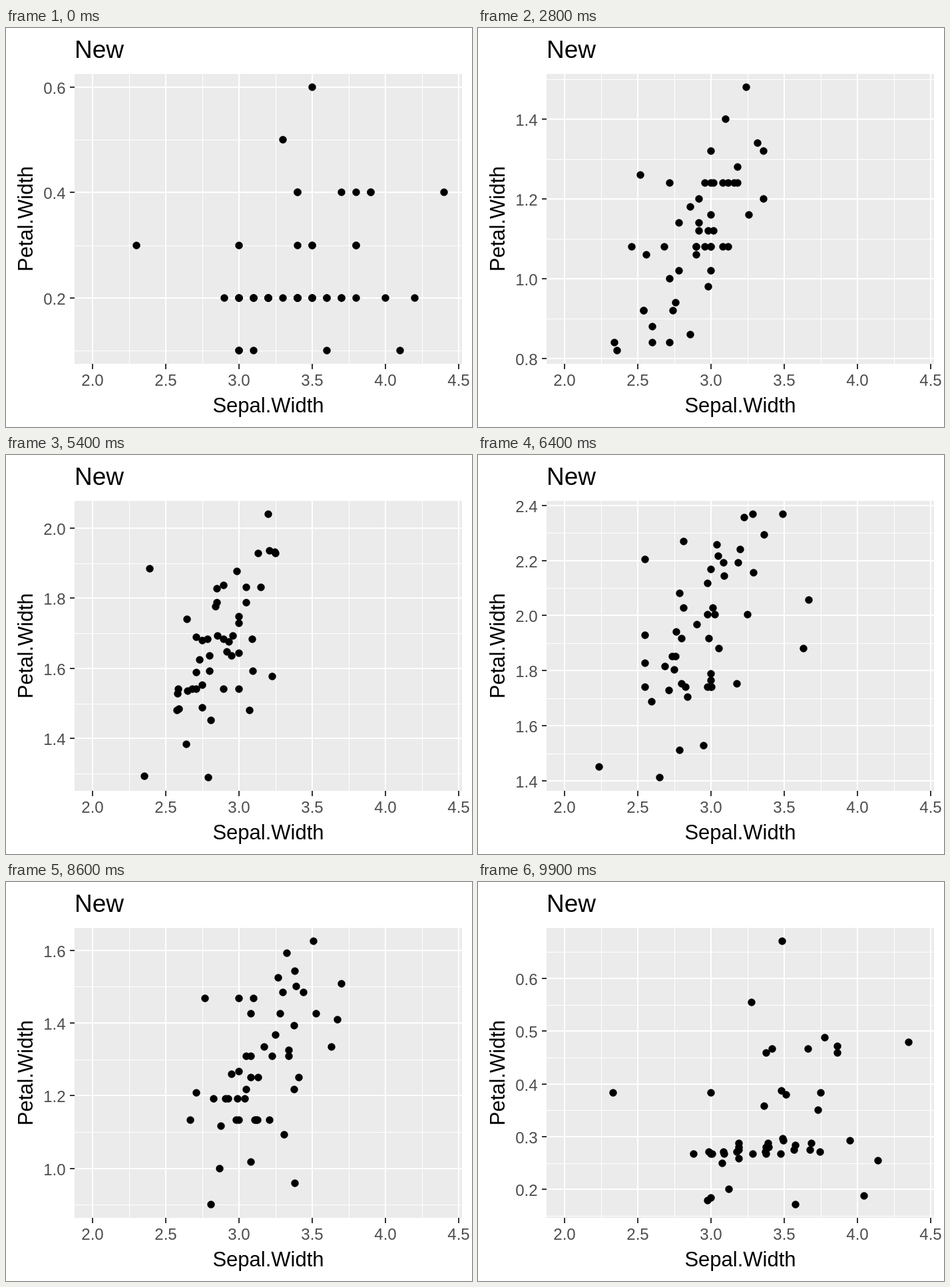
Animation, 700 px wide and 600 px high, one loop 10 s. Source, as an HTML page with a canvas:

```html
<!DOCTYPE html>
<html lang="en">
<head>
<meta charset="utf-8">
<title>Petal.Width by Sepal.Width</title>
<style>
  html, body { margin: 0; width: 100%; height: 100%; overflow: hidden; background: #fff; }
  canvas { display: block; }
</style>
</head>
<body>
<canvas id="plot" width="700" height="600"></canvas>
<script>
// Iris measurements in millimetres, in data set order.
const setosaSepal = [
  35, 30, 32, 31, 36, 39, 34, 34, 29, 31, 37, 34, 30, 30, 40, 44, 39, 35, 38, 38, 34, 37, 36, 33, 34,
  30, 34, 35, 34, 32, 31, 34, 41, 42, 31, 32, 35, 36, 30, 34, 35, 23, 32, 35, 38, 30, 38, 32, 37, 33];
const setosaPetal = [
  2, 2, 2, 2, 2, 4, 3, 2, 2, 1, 2, 2, 1, 1, 2, 4, 4, 3, 3, 3, 2, 4, 2, 5, 2,
  2, 4, 2, 2, 2, 2, 4, 1, 2, 2, 2, 2, 1, 2, 2, 3, 3, 2, 6, 4, 3, 2, 2, 2, 2];
const versicolorSepal = [
  32, 32, 31, 23, 28, 28, 33, 24, 29, 27, 20, 30, 22, 29, 29, 31, 30, 27, 22, 25, 32, 28, 25, 28, 29,
  30, 28, 30, 29, 26, 24, 24, 27, 27, 30, 34, 31, 23, 30, 25, 26, 30, 26, 23, 27, 30, 29, 29, 25, 28];
const versicolorPetal = [
  14, 15, 15, 13, 15, 13, 16, 10, 13, 14, 10, 15, 10, 14, 13, 14, 15, 10, 15, 11, 18, 13, 15, 12, 13,
  14, 14, 17, 15, 10, 11, 10, 12, 16, 15, 16, 15, 13, 13, 13, 12, 14, 12, 10, 13, 12, 13, 13, 11, 13];
const virginicaSepal = [
  33, 27, 30, 29, 30, 30, 25, 29, 25, 36, 32, 27, 30, 25, 28, 32, 30, 38, 26, 22, 32, 28, 28, 27, 33,
  32, 28, 30, 28, 30, 28, 38, 28, 28, 26, 30, 34, 31, 30, 31, 31, 31, 27, 32, 33, 30, 25, 30, 34, 30];
const virginicaPetal = [
  25, 19, 21, 18, 22, 21, 17, 18, 18, 25, 20, 19, 21, 20, 24, 23, 18, 22, 23, 15, 23, 20, 20, 18, 21,
  18, 18, 18, 21, 16, 19, 20, 22, 15, 14, 23, 24, 18, 18, 21, 24, 23, 19, 23, 25, 23, 19, 20, 23, 18];

const states = [
  { sepal: setosaSepal, petal: setosaPetal },
  { sepal: versicolorSepal, petal: versicolorPetal },
  { sepal: virginicaSepal, petal: virginicaPetal },
];
// Start and length of each transition, in steps of 100 ms.
const transitions = [
  { start: 8, length: 25 },
  { start: 42, length: 25 },
  { start: 76, length: 24 },
];
const STEP_MS = 100, STEPS = 100;
const panel = { left: 103, top: 69, right: 685, bottom: 505 };
const ctx = document.getElementById('plot').getContext('2d');

// Axis breaks by the extended Wilkinson algorithm (Talbot, Lin and Hanrahan).
function extendedBreaks(lo, hi, wanted = 5) {
  const nice = [1, 5, 2, 2.5, 4, 3];
  const range = hi - lo, unit = (0.1 * range) ** 2;
  const weigh = (simple, cover, dense) => 0.25 * simple + 0.2 * cover + 0.5 * dense + 0.05;
  let best = { score: -2 };
  for (let j = 1; ; j++) {
    for (let i = 0; i < nice.length; i++) {
      const q = nice[i], simple = 1 - i / (nice.length - 1) - j;
      if (weigh(simple + 1, 1, 1) < best.score) return best;
      for (let k = 2; ; k++) {
        const denseMax = k >= wanted ? 2 - (k - 1) / (wanted - 1) : 1;
        if (weigh(simple + 1, 1, denseMax) < best.score) break;
        for (let z = Math.ceil(Math.log10(range / (k + 1) / j / q)); ; z++) {
          const step = j * q * 10 ** z, span = step * (k - 1);
          const coverMax = span > range ? 1 - ((span - range) / 2) ** 2 / unit : 1;
          if (weigh(simple + 1, coverMax, denseMax) < best.score) break;
          const last = Math.ceil(lo / step) * j;
          for (let s = Math.floor(hi / step) * j - (k - 1) * j; s <= last; s++) {
            const min = s * step / j, max = min + span;
            const hasZero = s % j === 0 && min <= 0 && max >= 0 ? 1 : 0;
            const cover = 1 - 0.5 * ((hi - max) ** 2 + (lo - min) ** 2) / unit;
            const ratio = (Math.max(max, hi) - Math.min(min, lo)) / step / (wanted - 1);
            const score = weigh(simple + hasZero, cover, 2 - Math.max(ratio, 1 / ratio));
            if (score > best.score) best = { score, min, step, count: k };
          }
        }
      }
    }
  }
}

function text(string, x, y, size, color, align) {
  ctx.font = `${size}px "Liberation Sans", Arial, sans-serif`;
  ctx.fillStyle = color;
  ctx.textAlign = align;
  ctx.fillText(string, x, y);
}

function rect(x, y, width, height, color) {
  ctx.fillStyle = color;
  ctx.fillRect(x, y, width, height);
}

const vLine = (x, width) =>
  rect(x - (width >> 1), panel.top, width, panel.bottom - panel.top, '#fff');
const hLine = (y, width) =>
  rect(panel.left, y - (width >> 1), panel.right - panel.left, width, '#fff');

const xPos = value => Math.round(130 + 220 * (value - 2));

function pointsAt(step) {
  let index = 0;
  while (index < 2 && step >= transitions[index + 1].start) index++;
  const { start, length } = transitions[index];
  const progress = Math.min(1, Math.max(0, (step - start) / length));
  const from = states[index], to = states[(index + 1) % 3];
  const mix = key => from[key].map((v, i) => (v + (to[key][i] - v) * progress) / 10);
  return { sepal: mix('sepal'), petal: mix('petal') };
}

function draw(step) {
  const { sepal, petal } = pointsAt(step);
  const min = Math.min(...petal), max = Math.max(...petal);
  const pad = 0.05 * (max - min), lo = min - pad, hi = max + pad;
  const yPos = v => Math.round(505.1 - (v - lo) / (hi - lo) * 436);
  const visible = v => v >= lo && v <= hi;

  const axis = extendedBreaks(lo, hi);
  const major = [], minor = [];
  for (let i = -1; i <= axis.count; i++) {
    const value = axis.min + i * axis.step;
    if (i >= 0 && i < axis.count && visible(value)) major.push(value);
    if (visible(value + axis.step / 2)) minor.push(value + axis.step / 2);
  }
  const oneDecimal = major.every(v => Math.abs(v * 10 - Math.round(v * 10)) < 1e-6);

  rect(0, 0, 700, 600, '#fff');
  rect(panel.left, panel.top, panel.right - panel.left, panel.bottom - panel.top, '#ebebeb');
  minor.forEach(v => hLine(yPos(v), 1));
  for (let v = 2.25; v < 4.5; v += 0.5) vLine(xPos(v), 1);
  major.forEach(v => hLine(yPos(v), 2));
  for (let v = 2; v <= 4.5; v += 0.5) vLine(xPos(v), 2);

  ctx.fillStyle = '#000';
  sepal.forEach((v, i) => {
    ctx.beginPath();
    ctx.arc(xPos(v), yPos(petal[i]), 5.75, 0, 2 * Math.PI);
    ctx.fill();
  });

  for (const v of major) {
    rect(96, yPos(v) - 1, 7, 2, '#333');
    text(v.toFixed(oneDecimal ? 1 : 2), 89.5, yPos(v) + 9.5, 24, '#4d4d4d', 'right');
  }
  for (let v = 2; v <= 4.5; v += 0.5) {
    rect(xPos(v) - 1, panel.bottom, 2, 8, '#333');
    text(v.toFixed(1), xPos(v), 538, 24, '#4d4d4d', 'center');
  }

  text('New', 103, 45, 37, '#000', 'left');
  text('Sepal.Width', 394, 578, 31, '#000', 'center');
  ctx.save();
  ctx.translate(40, 287);
  ctx.rotate(-Math.PI / 2);
  text('Petal.Width', 0, 0, 31, '#000', 'center');
  ctx.restore();
}

const begin = performance.now();
function tick() {
  draw(Math.floor((performance.now() - begin) / STEP_MS) % STEPS);
  requestAnimationFrame(tick);
}
tick();
</script>
</body>
</html>
```
